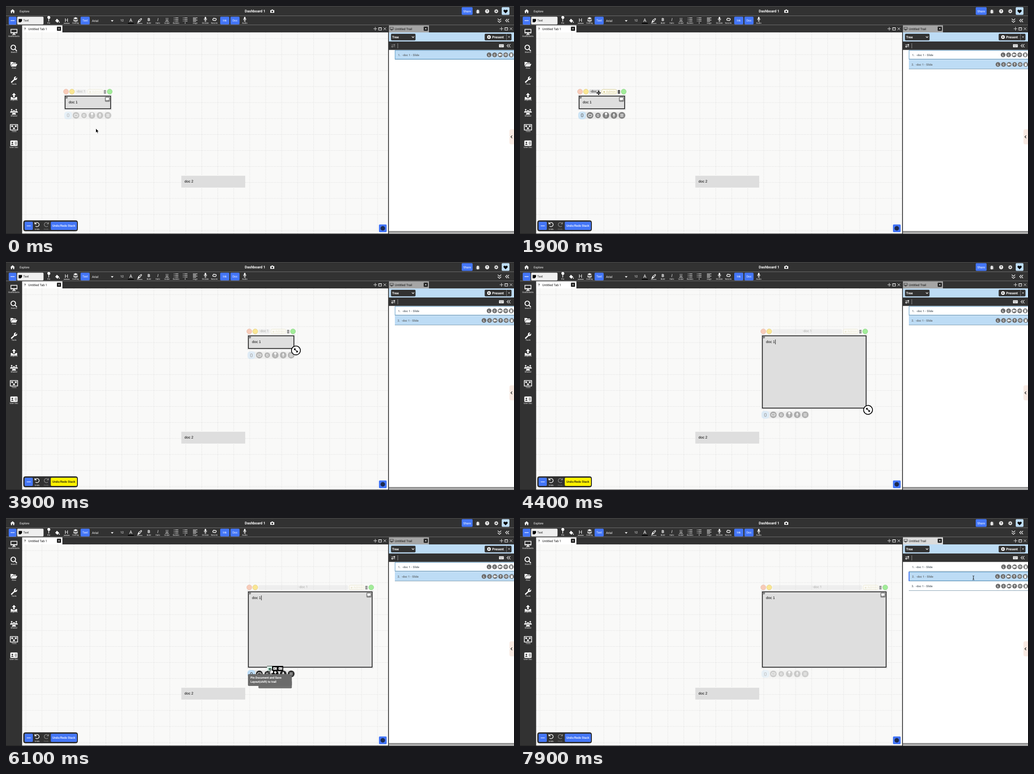
Animation, 1117 px wide and 501 px high, one loop 8000 ms. Source, as an HTML page:

```html
<!DOCTYPE html>
<html lang="en">
<head>
<meta charset="utf-8">
<title>Trail demo</title>
<style>
html,body{margin:0;width:100%;height:100%;overflow:hidden;background:#323232}
svg{display:block;font-family:Roboto,Arial,sans-serif}
text{white-space:pre;text-rendering:geometricPrecision}
</style>
</head>
<body>
<svg width="1117" height="501" viewBox="0 0 1117 501"><g id="base"></g><g id="live"></g></svg>
<script>
const DARK = '#323232', BLUE = '#4476f7', PALE = '#bddcf5', WHITE = '#fff', GREY = '#dedede';
const LOOP = 8000, STEP = 100;

const rect = (x, y, w, h, fill, r = 0, more = '') =>
  `<rect x="${x}" y="${y}" width="${w}" height="${h}" fill="${fill}" rx="${r}" ${more}/>`;
const disc = (x, y, r, fill, more = '') => `<circle cx="${x}" cy="${y}" r="${r}" fill="${fill}" ${more}/>`;
const text = (x, y, s, size, fill = WHITE, more = '') =>
  `<text x="${x}" y="${y}" font-size="${size}" fill="${fill}" ${more}>${s}</text>`;
const mid = (x, y, s, size, fill = WHITE, more = '') => text(x, y, s, size, fill, 'text-anchor="middle" ' + more);
const line = (x, y, d, color = WHITE, w = 1, fill = 'none', more = '') =>
  `<path transform="translate(${x} ${y})" d="${d}" stroke="${color}" stroke-width="${w}" fill="${fill}" ${more}/>`;
const solid = (x, y, d, fill = WHITE) => line(x, y, d, 'none', 0, fill, 'fill-rule="evenodd"');
const group = (opacity, s) => `<g opacity="${opacity}">${s}</g>`;
const turned = (x, y, angle, s) => `<g transform="translate(${x} ${y}) rotate(${angle})">${s}</g>`;
const scaled = (x, y, k, s) => `<g transform="translate(${x} ${y}) scale(${k})">${s}</g>`;
const bold = 'font-weight="700"', medium = 'font-weight="500"';
const arial = 'font-family="Liberation Sans,Arial,sans-serif"';

const SHAPE = {
  home: 'M-5 0L0-4.5L5 0H3.7V4.3H1.2V1H-1.2V4.3H-3.7V0Z',
  camera: 'M-4.3-2.5H-2L-1.2-3.7H1.2L2-2.5H4.3V3.5H-4.3ZM0-1.4A1.9 1.9 0 1 0 .01-1.4Z',
  heart: 'M0 4L-4 0C-6-3-2-5.5 0-2.5C2-5.5 6-3 4 0Z',
  monitor: 'M-7.5-6.5H7.5V3H1.3V5H4V6.5H-4V5H-1.3V3H-7.5ZM-6-5V.8H6V-5Z',
  folder: 'M-7.5 4V-5H-2.5L-1-3.5H4.5V-1.8H-4ZM-6.7 5L-3.7-.7H7.5L4.6 5Z',
  wrench: 'M-6.5 4.5L.2-1.5C-1-5 2-8 5-6.6L2.5-4L4-2.3L6.7-5C8-1.5 5 1.6 1.7.4L-4.4 6.5C-6 7-7 6-6.5 4.5Z',
  upload: 'M0-8L4.5-3.3H1.5V2H-1.5V-3.3H-4.5ZM-7 1H-3V3.5H3V1H7V6.5H-7Z',
  mic: 'M-1.6-4.5Q0-6.8 1.6-4.5V-.2Q0 1.8-1.6-.2ZM-3.2-2H-2.4V0Q0 3.5 2.4 0V-2H3.2V.6L.5 2.8V4H2V4.8H-2V4H-.5V2.8L-3.2.6Z',
  pin: 'M-3-4A3.2 3.2 0 1 1 .7-1.2V4.5H-.7V-1.2Q-2.7-1.7-3-4Z',
  layers: 'M0-5.5L5-3L0-.7L-5-3ZM-5-.8L0 1.5L5-.8V.6L0 3L-5 .6ZM-5 1.6L0 4L5 1.6V2.8L0 5.2L-5 2.8Z',
  bucket: 'M-1-4.5L4 .3L0 4.3L-4.8 0ZM4.3 1.2Q6.2 4.2 4.3 4.4Q2.6 4 4.3 1.2Z',
  pen: 'M-3.5 1.5L-3-.5L3.2-5.5L5.2-3.5L.5 2.8L-1.3 3.2L-2.3 4.4H-5.3ZM-1.8 .3L-.3 1.8L3.7-3.4L3-4.1Z'
};
const LINK = 'M-.8 1.2A2 2 0 0 1-3.8-1.2L-2-2.8Q0-3.8 1-1.5M.8-1.2A2 2 0 0 1 3.8 1.2L2 2.8Q0 3.8-1 1.5';
const CROSS = 'M-2.8-2.8L2.8 2.8M2.8-2.8L-2.8 2.8';
const LEFTS = 'M0-3.5L-3.5 0L0 3.5M4-3.5L.5 0L4 3.5';

function tabButtons(x) {
  return line(x, 50, 'M-4 0H4M0-4V4', '#ddd') + line(x + 10.5, 50, 'M-3-2.5H3V3H-3ZM-3-2H3', '#eee', 1.1) +
    line(x + 21, 50, CROSS, '#ddd');
}
function closeBox(x) {
  return rect(x - 4.5, 45.5, 9, 9, '#181818', 1) + line(x, 50, 'M-2-2L2 2M2-2L-2 2', WHITE, .9);
}

function sidebar() {
  const items = [['Dashboards', 57], ['Search', 92], ['Files', 127], ['Tools', 162],
    ['Imports', 197], ['Shared', 232], ['Trails', 266], ['User Doc', 301]];
  const person = (x, y, k) => disc(x, y, 2 * k, '#eee') +
    solid(x, y, `M${-4 * k} ${7 * k}Q${-4 * k} ${2.7 * k} 0 ${2.7 * k}T${4 * k} ${7 * k}Z`, '#eee');
  const pics = [solid(17.5, 57, SHAPE.monitor), line(16, 91, 'M5 0A5 5 0 1 1 5-.1ZM3.5 3.5L8 8', WHITE, 1.9),
    solid(17.5, 128, SHAPE.folder), solid(17.5, 162, SHAPE.wrench), solid(17.5, 199, SHAPE.upload),
    person(12.5, 228, .9) + person(22.5, 228, .9) + person(17.5, 231, 1.1),
    line(17.5, 266.5, 'M-8-6H8V6H-8Z', WHITE, 1.6) +
      solid(17.5, 266.5, 'M-6-4H-2V-1H-6ZM2-4H6V-1H2ZM-2 1H2V4H-2Z') + line(17.5, 266.5, 'M-3-2L0 2L4-2', WHITE, .8),
    rect(9.5, 295.5, 16, 12, WHITE, 1.5) + disc(14, 300, 1.8, DARK) +
      solid(14, 300, 'M-3 5Q0 0 3 5Z', DARK) + line(20, 299, 'M-1 0H4M-1 2.5H4M-1 5H4', DARK, .9)];
  return pics.join('') + items.map(([s, y]) => mid(17.5, y + 11, s, 4.6)).join('');
}

function topBar() {
  let rays = '';
  for (let a = 0; a < 180; a += 45) rays += turned(1078, 11.5, a, line(0, 0, 'M0-4.5V4.5', '#eee', 1.6));
  return solid(14.5, 11.5, SHAPE.home) + text(30, 13.5, 'Explore', 6.5) +
    mid(547.7, 14.3, 'Dashboard 1', 8, WHITE, bold) + solid(585.5, 11.5, SHAPE.camera) +
    rect(1002, 2.5, 24, 17, BLUE, 2) + mid(1014, 13.7, 'Share', 6.7) +
    solid(1037.5, 12, 'M-2.3-2Q0-6.5 2.3-2V3Q0 6-2.3 3Z', '#eee') +
    line(1037.5, 12, 'M-4-3L-2-1.3H2L4-3M-4.5 .7H4.5M-4 4L-2 2H2L4 4', '#eee', .9) +
    disc(1058, 11.5, 4.5, '#eee') + mid(1058, 14, '?', 7, DARK, bold) +
    rays + disc(1078, 11.5, 3.3, '#eee') + disc(1078, 11.5, 1.5, DARK) +
    rect(1090, 2.5, 17, 17, PALE, 2) + solid(1098.5, 12, SHAPE.heart, '#000');
}

function makeBase() {
  let s = rect(0, 0, 1117, 501, DARK) + rect(35.5, 58, 805, 442, '#f9f9f8');
  const dots = (d) => line(0, 0, d, '#d5d5d5', .9, 'none', 'stroke-dasharray="1.4 2.1"');
  for (let x = 43.8; x < 840; x += 35.15) s += dots(`M${x} 58V500`);
  for (let y = 71.7; y < 500; y += 35.12) s += dots(`M36 ${y}H840`);
  s += rect(0, 0, 1117, .8, '#555') + rect(0, 21, 1117, 1, '#707070') + rect(0, 41, 1117, 1, '#707070') + topBar() + sidebar();
  s += rect(6, 23.5, 17, 17.5, BLUE, 2) + rect(10, 31.5, 9, 1.2, WHITE) +
    line(1085, 32, 'M-3.8-4L0-.5L3.8-4M-3.8 .5L0 4L3.8 .5', WHITE, 1.2) + line(1102, 32, LEFTS, WHITE, 1.2);
  s += tabButtons(812);
  // right-hand panel
  s += rect(840.5, 42, 1.5, 458, DARK) + rect(842, 58, 275, 442, WHITE) + tabButtons(1089.5) +
    rect(842, 58, 275, 20, PALE) + rect(846.5, 61, 54, 14.5, DARK, 2) + text(849, 70.8, 'Tree', 7.2, WHITE, bold) +
    line(895, 68, 'M-2.5-1L0 1.5L2.5-1', WHITE, 1.2) + rect(1052.5, 61, 59, 14.5, DARK, 2) +
    disc(1062, 68.2, 4, WHITE) + solid(1062, 68.2, 'M-1.3-2L2 0L-1.3 2Z', DARK) +
    text(1069, 70.8, 'Present', 7.3, WHITE, bold) + rect(1100, 61, .8, 14.5, '#888') +
    solid(1106, 68, 'M-2-.8H2L0 1.4Z') + rect(842, 78, 275, 18.5, DARK) + rect(861, 82, .8, 11, '#aaa') +
    line(1105, 87.3, LEFTS, WHITE, 1.1) + rect(842, 494.5, 275, 4, '#8c8c8c') +
    rect(1107, 271, 14, 33, '#f9ebe4', 4) + line(1111.5, 287.5, 'M1.5-2.8L-1.3 0L1.5 2.8', '#111', 1.2) +
    rect(0, 500, 1117, 1, '#222');
  // canvas furniture
  s += rect(385.5, 373, 140.5, 26, GREY) + text(392.5, 388, 'doc 2', 8, '#000', arial) +
    rect(820, 480, 17, 17, BLUE, 2) + disc(828.5, 488.5, 5, '#1d2b4f') +
    rect(38.5, 471.5, 119, 23, DARK, 4, 'stroke="#222"') + rect(41, 474, 18, 18, BLUE, 2) + rect(45.5, 482.6, 9, 1.1, WHITE);
  const turn = 'M-5-5V-1.2H-1.2M-4.5-1.5A4.6 4.6 0 1 1-3.6 3.4';
  s += line(68.5, 480, turn, WHITE, 1.4) + mid(68.5, 491.5, 'Undo', 4.5) +
    scaled(88.5, 480, '-1 1', line(0, 0, turn, '#888', 1.4)) + mid(88.5, 491.5, 'Redo', 4.5, '#777');
  return s;
}

const blueButton = (x, s) => rect(x, 23.5, 20, 17, BLUE, 2) + mid(x + 10, 34, s, 6.4);
const mic = (x, s) => solid(x, 29.5, SHAPE.mic) + mid(x, 38.5, s, 4.6);

function toolbar(selected) {
  let s = rect(24.5, 23.5, 58, 17, '#efefef', 2);
  if (!selected) return s + text(28, 34, 'None Selected', 6.6, '#111') + blueButton(85, 'Text') + blueButton(108, 'Ink') + mic(139, 'Audio');
  s += solid(31.5, 32, 'M-3.7-3.5H3.7V1L1 3.7H-3.7Z', '#000') + text(38, 34, 'Text', 6.4, '#111') +
    solid(94, 29.5, SHAPE.pin) + solid(113, 32.5, SHAPE.bucket) + mid(133, 35, 'H', 11) + rect(127, 37.5, 13, 1.2, '#ddd') +
    solid(153, 30, SHAPE.layers) + blueButton(164, 'Text') + text(189, 34.5, 'Arial', 7, WHITE, arial) +
    solid(233.5, 32.5, 'M-3-1.3H3L0 2Z') + mid(255, 34, '12', 6.6) + mid(274.5, 35, 'A', 10.5) + rect(268, 37, 13, 2, '#050505') +
    solid(294, 32, SHAPE.pen) + rect(288, 37.8, 12, 1, '#ddd') +
    mid(314, 32.7, 'B', 9, WHITE, bold) + mid(334, 32.7, 'I', 9, WHITE, 'font-style="italic"') +
    mid(354, 32, 'U', 8.5) + rect(350, 33, 8, .9, WHITE);
  for (const x of [374, 394]) s += line(x, 29.5, 'M-2-3.5H5M-2 0H5M-2 3.5H5M-5-3.5H-3.5M-5 0H-3.5M-5 3.5H-3.5', WHITE, 1.2);
  s += line(416, 29.5, 'M-5-3.5H5M-5-1H2M-5 1.5H5M-5 4H2', WHITE, 1.1) + turned(458.5, 29.5, -20, line(0, 0, LINK, WHITE, 1.4)) +
    blueButton(471, 'Ink') + blueButton(493.5, 'Doc') + mic(438.5, 'Dictate') + mic(525, 'Audio');
  const names = {94: 'Pin', 153: 'Overlay', 314: 'Bold', 334: 'Italic', 354: 'Under', 374: 'Bullets', 394: '#', 416: 'Align', 458: 'NoLink'};
  for (const x in names) s += mid(x, 38.7, names[x], 4.6);
  return s;
}

function row(n, {fill, box, bar}) {
  const y = 86 + n * 21.2, dx = box || bar ? 0 : 1, dark = '#6c6c6c';
  let s = fill ? rect(855, y - 10, 262, 20, PALE) : '';
  s += rect(855, y + 9.5, 262, .9, '#7795aa');
  if (box || bar) s += rect(855.5, y - 9.7, 264, 19.2, 'none', 0, 'stroke="#6ba3cb" stroke-width="1.2"');
  if (bar) s += rect(854.5, y - 10, 2, 20, BLUE);
  s += text(862 - dx * (n > 1), y + 2.3, n + '.', 6.3, '#6b747b', bold) +
    text(871 - dx * 1.5, y + 2.3, '-doc 1 - Slide', 6.3, '#6b747b', bold);
  const kinds = n === 1 ? 'LCVET' : 'LCVUET';
  [...kinds].forEach((k, i) => {
    const x = 1111 + dx - (kinds.length - 1 - i) * 12.2;
    s += disc(x, y, 5.2, dark);
    s += k === 'V' ? rect(x - 3.4, y - 2.2, 4.6, 4.4, WHITE, .8) + solid(x, y, 'M1.5-.5L3.5-2V2L1.5 .5Z')
      : k === 'U' ? line(x, y, 'M0 3V-2.5M-2.2-.3L0-2.6L2.2-.3', WHITE)
      : k === 'E' ? line(x, y, 'M-3.5 0Q0-4.4 3.5 0Q0 4.4-3.5 0Z', WHITE, .9) + disc(x, y, 1.1, WHITE)
      : k === 'T' ? solid(x, y, 'M-2.8-3H2.8V-2H-2.8ZM-2.2-1.5H2.2V3.5H-2.2Z')
      : mid(x, y + 2.3, k, 6.3, WHITE, bold);
  });
  return s;
}

function trail(t) {
  if (t < 1300) return row(1, {fill: 1, box: 1});
  if (t < 6500) return row(1, {box: 1}) + row(2, {fill: 1});
  if (t < 7500) return row(1, {box: 1}) + row(2, {}) + row(3, {fill: 1});
  return row(1, {}) + row(2, {fill: 1, bar: 1}) + row(3, {});
}

// Interpolates rows of [time, ...values] with a soft start and stop.
function at(keys, t) {
  let i = keys.findIndex(k => k[0] > t);
  if (i < 0) return keys.at(-1).slice(1);
  const a = keys[i - 1], b = keys[i], u = (t - a[0]) / (b[0] - a[0]), e = u * u * (3 - 2 * u);
  return a.slice(1).map((v, j) => v + (b[j + 1] - v) * e);
}
const PLACE = [[0, 130, 198], [1900, 130, 198], [2500, 533, 162.3]];
const SIZE = [[0, 100, 27.7], [3900, 100, 27.7], [4400, 228, 158.7], [4800, 272, 165.5]];
const POINTER = [[0, 197.5, 269], [500, 190, 242], [800, 186, 236], [1000, 180, 228], [1400, 180, 229], [1900, 173, 191],
  [2500, 576.5, 155.5], [3100, 575.5, 172.5], [3400, 584, 176], [3800, 637, 194], [3900, 637.5, 194.3],
  [4400, 765.3, 325], [4800, 809, 332], [4900, 808, 332], [5200, 622, 342], [5600, 592, 341], [6000, 583, 335],
  [6500, 583, 335], [7200, 970, 128], [7500, 997, 131.5]];
const KINDS = [[0, 'arrow'], [600, 'finger'], [1500, 'arrow'], [1800, 'move'], [2600, 'palm'], [3400, 'arrow'],
  [3800, 'resize'], [4900, 'arrow'], [5300, 'finger'], [6700, 'arrow'], [7200, 'beam']];
const LOWER = [[0, .3], [300, .3], [600, 1], [1600, 1], [1900, .72], [2000, .3], [3300, .3], [3700, .4], [4400, .45],
  [5000, .35], [5300, 1], [6600, 1], [7000, .27]];
const UPPER = [[0, .3], [1600, .3], [1900, 1], [2000, 1], [3300, .35]];
const within = (t, ...spans) => spans.some(([a, b]) => t >= a && t < b);

function cursor(t) {
  const [x, y] = at(POINTER, t), kind = KINDS.findLast(k => k[0] <= t)[1];
  const draw = {
    arrow: () => line(x, y, 'M0 0V9.5L2.1 7.5L3.6 10.8L5.2 10.1L3.7 7H6.7Z', WHITE, .7, '#000'),
    finger: () => line(x, y, 'M-1.5-3.5Q-.5-5 .5-3.5V-.5L4.5 .7V4L3 6.5H-1L-4 2.3Q-3.3 .8-1.5 2.2Z', '#000', .8, WHITE),
    palm: () => line(x, y, 'M-4 0Q-3-1-2 .5L-2.7-3Q-1.5-4.5-.7-3Q.2-5.5 1-3Q2.4-4 2.7-2.3Q4.2-2.5 4.2-1V2L2.8 5H-1.5Z', '#000', .9, WHITE),
    move: () => line(x, y, 'M-4 0H4M0-4V4M-2.5-1.5L-4 0L-2.5 1.5M2.5-1.5L4 0L2.5 1.5M-1.5-2.5L0-4L1.5-2.5M-1.5 2.5L0 4L1.5 2.5', '#000', 1.2),
    resize: () => disc(x, y, 9.8, WHITE, 'stroke="#000" stroke-width="1.7"') +
      line(x, y, 'M-3.5-3.5L3.5 3.5M-3.5-.5V-3.5H-.5M3.5 .5V3.5H.5', '#000', 1.4),
    beam: () => line(x, y, 'M-2-4.5Q0-4.5 0-3Q0-4.5 2-4.5M0-3V3M-2 4.5Q0 4.5 0 3Q0 4.5 2 4.5M-1.2 1H1.2', '#111', .9)
  };
  return draw[kind]();
}

function upperControls(x, y, r, t) {
  const cy = y - 9.8, width = r - x - 75;
  return rect(x - 3, y - 3, r - x + 6, .8, '#e9e9e9') + disc(x + 2, cy, 5.6, '#f7cbb9', 'stroke="#e5b7a4" stroke-width=".7"') +
    disc(x + 15, cy, 5.6, '#fae693', 'stroke="#d9c87e" stroke-width=".7"') +
    disc(r - 2, cy, 5.6, '#a2ec99', 'stroke="#8acd83" stroke-width=".7"') +
    group(at(UPPER, t)[0], rect(x + 22, cy - 5, width, 10, '#dcdcdc', 3) +
      mid(x + 22 + width / 2, cy + 1.8, '-doc 1', 7.4, '#222') +
      rect(r - 50.5, cy - 5, 33, 10, '#fffdf2', 3, 'stroke="#cfc48a" stroke-width=".9"') +
      disc(r - 45, cy + .7, 1.8, '#cfc48a') + text(r - 41, cy + 2.9, 'Admin', 7.4, '#d4ca98')) +
    group(.35 + .65 * at(UPPER, t)[0], rect(r - 15, cy - 3.5, 5, 8, '#444', .8) + line(r - 12.5, cy, 'M-1.2-1.5V3M1.2-1.5V3', '#ccc', .6));
}

function lowerControls(x, b, t) {
  const y = b + 14.7, hot = within(t, [600, 1600], [5300, 6700]), ink = hot ? '#2b2b2b' : '#555';
  let s = rect(x - 2, y - 8, 105, 16, '#e2e2e2', 8) + rect(x - 2, y - 8.5, 17, 17, PALE, 6) +
    mid(x + 6.5, y + 4, '0', 11, '#222');
  [24, 41.5, 59, 76.5, 94].forEach((dx, i) => s += disc(x + dx, y, i === 1 ? 6 : 7.3, hot && i === 2 ? '#000' : ink));
  s += turned(x + 24, y, -20, line(0, 0, LINK, WHITE, 1.2)) +
    line(x + 41.5, y, 'M1-2H-2V2.3H2V0M-.5 .7L2.7-2.7', WHITE, .9) +
    scaled(x + 59, y, .8, solid(0, 0, SHAPE.pin)) + scaled(x + 76.5, y, .8, solid(0, 0, SHAPE.mic)) +
    line(x + 94, y, 'M-3.5-2.5H3.5M-3.5 0H3.5M-3.5 2.5H3.5', WHITE, 1.1);
  return group(at(LOWER, t)[0], s);
}

function pinMenu(x, b, t) {
  if (!within(t, [700, 1500], [5400, 6600])) return '';
  const late = t > 5000;
  let s = rect(x + 41, b - 2.7, 35.5, 11.5, '#000');
  [46.5, 58.5, 70.5].forEach((dx, i) => s += rect(x + dx - 4, b + .3, 8, 5.5, WHITE, .5) +
    (i ? disc(x + dx - 1.5, b + 3, 1, '#000') + line(x + dx, b + 3, 'M1-1.3H3M1 1H3', '#000', .7) : ''));
  if (late && t >= 5700) s += rect(x + 41, b - 2, 11, 10, '#d8efe6') + solid(x + 46.5, b + 3, 'M-2-1H3V3H-2Z', '#39715d');
  if (t >= (late ? 5500 : 800)) s += rect(x + 22, b + 30, 73.5, 16.5, '#707070', 2) +
    group(late && t >= 5800 ? .15 : 1, mid(x + 58.7, b + 39.7, 'Pin Document to Trail', 6.3, WHITE, bold));
  if (late && t >= 5800) s += rect(x - 1, b + 15.3, 96.5, 26, '#6b6b6b', 2) +
    text(x + 4.5, b + 24.8, 'Pin Document and Save', 6.4, WHITE, bold) + text(x + 4.5, b + 34.5, 'Layout(shift) to trail', 6.4, WHITE, bold);
  return s;
}

function documentOne(t) {
  const [x, y] = at(PLACE, t), [w, h] = at(SIZE, t), r = x + w, b = y + h;
  const chosen = !within(t, [2000, 3300]), free = within(t, [2600, 3300]);
  let s = chosen ? rect(x - 3, y - 3, w + 6, h + 6, '#e6e6e6', 1) : '';
  s += rect(x, y, w, h, GREY, 0, `stroke="${free ? BLUE : '#080808'}" stroke-width="1.5"`);
  if (free) s += rect(x + 45, y + 7, 48, 13, '#dadada');
  s += text(x + 8, y + 16, 'doc 1', 8, '#000', arial);
  if (within(t, [2900, 6900]) && (t - 100) % 1000 < 500) s += rect(x + 28.2, y + 8, .9, 10.5, '#000');
  if (!chosen) return s;
  s += disc(x + 3, y + 3, 2.7, '#858585') + upperControls(x, y, r, t);
  if (!within(t, [3900, 4900])) s += rect(r - 12.5, y + 1.5, 11, 11, '#858585', 2) +
    solid(r - 7, y + 6.5, 'M-3.5-3H3.5V2H0L-1.5 3.6V2H-3.5Z');
  else s += solid(r, b, 'M0-4V0H-4Z', '#111');
  return s + lowerControls(x, b, t) + pinMenu(x, b, t);
}

function tabs(t, free) {
  return rect(35.5, 42.5, 88.5, 15.5, free ? '#d8d8d8' : WHITE) + text(40, 53, '?', 7.2, '#111', medium) +
    text(49, 52.7, 'Untitled Tab 1', 6.8, '#111') + closeBox(116.5) +
    rect(842, 42.5, 88, 15.5, t < 7000 ? '#a5a5a5' : '#dcdcdc') + scaled(848, 50, .55, solid(0, 0, SHAPE.monitor, DARK)) +
    text(855, 52.7, 'Untitled Trail', 6.8, '#111') + closeBox(923);
}

function makeLive(t) {
  const free = within(t, [2600, 3300]), busy = within(t, [1300, 1600], [2100, 2700], [3900, 4900], [6500, 6800]);
  return toolbar(!free) + tabs(t, free) +
    line(851.5, 87.3, 'M-4-1.8H3.5M1.5-3.7L3.7-1.8L1.5 0M4 2H-3.5M-1.5 0L-3.7 2L-1.5 4', t < 1300 ? '#888' : WHITE, 1.1) +
    rect(1084, 84, 10.5, 6.8, free ? '#8cc3f0' : WHITE, 1) +
    line(1089.2, 87.3, 'M-4-1.6H4M-4 .1H4M-2.5 2H2.5', DARK, .8, 'none', 'stroke-dasharray="1 .8"') +
    trail(t) + rect(98.5, 474, 57.5, 18, busy ? '#fff200' : BLUE, 2) +
    mid(127.2, 485.2, 'Undo/Redo Stack', 6.45, busy ? '#111' : WHITE, medium) + documentOne(t) + cursor(t);
}

const live = document.getElementById('live');
document.getElementById('base').innerHTML = makeBase();
const start = performance.now();
let shown = -1;
function tick() {
  const t = Math.floor((performance.now() - start) % LOOP / STEP) * STEP;
  if (t !== shown) live.innerHTML = makeLive(shown = t);
  requestAnimationFrame(tick);
}
tick();
</script>
</body>
</html>
```
